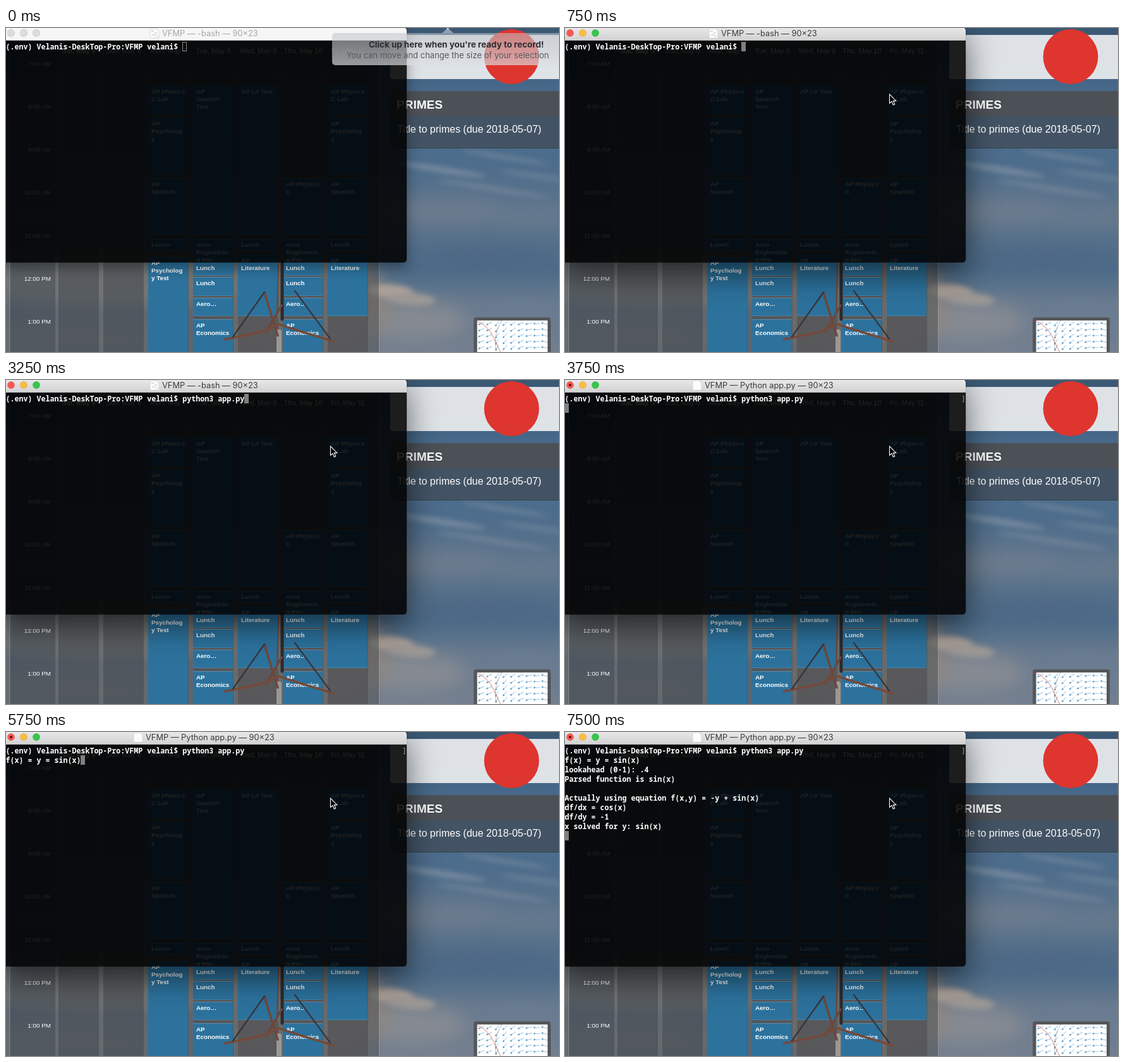
An HTML page that plays this animation: 875x514 px, repeating every 8 s.

```html
<!DOCTYPE html>
<html lang="en">
<head>
<meta charset="utf-8">
<title>Terminal session</title>
<style>
  html, body { margin: 0; width: 100%; height: 100%; overflow: hidden; background: #3a5d82; }
  #stage { position: relative; width: 875px; height: 514px; overflow: hidden; }
  svg { position: absolute; left: 0; top: 0; display: block; }
  text { white-space: pre; }
  #shade {
    position: absolute; left: -6px; top: -4px; width: 640px; height: 375.5px;
    border-radius: 5px; background: rgba(0, 0, 0, .87);
    box-shadow: 0 18px 50px rgba(0, 0, 0, .58), 0 0 1px #000;
  }
  #shade.idle { box-shadow: 0 8px 22px rgba(0, 0, 0, .38), 0 0 1px #000; }
  .cal { font-family: "Liberation Sans", Arial, sans-serif; fill: #fff; }
  .ui { font-family: Inter, "Open Sans", sans-serif; }
  .mono { font: 600 11.667px "Noto Sans Mono", "DejaVu Sans Mono", monospace; fill: #fff; }
</style>
</head>
<body>
<div id="stage">
  <svg id="back" width="875" height="514">
    <defs>
      <linearGradient id="sky" x1="0" y1="0" x2="0" y2="1">
        <stop offset="0" stop-color="#3a5874"/>
        <stop offset=".2" stop-color="#486a8b"/>
        <stop offset=".42" stop-color="#4d6d8c"/>
        <stop offset=".58" stop-color="#5f758c"/>
        <stop offset=".74" stop-color="#4b6a88"/>
        <stop offset=".84" stop-color="#66798e"/>
        <stop offset="1" stop-color="#747f8f"/>
      </linearGradient>
      <filter id="soft" x="-50%" y="-150%" width="200%" height="400%"><feGaussianBlur stdDeviation="14"/></filter>
      <filter id="wisp" x="-50%" y="-150%" width="200%" height="400%"><feGaussianBlur stdDeviation="5 4"/></filter>
    </defs>
    <rect width="875" height="514" fill="url(#sky)"/>
    <g id="clouds" filter="url(#soft)"></g>
    <g id="streaks" filter="url(#wisp)"></g>
    <g id="calendar" class="cal"></g>
    <g id="rocket" fill="none" stroke-linecap="round">
      <path d="M437 372V462" stroke="#2c2a2d" stroke-width="5"/>
      <path d="M431 374L429 450" stroke="#70473d" stroke-width="2"/>
      <path d="M432 482V514" stroke="#9b9794" stroke-width="8"/>
      <path d="M409 420L430 488M436 440L412 482" stroke="#6e4638" stroke-width="3.5"/>
      <path d="M346 494L404 482L432 470L462 480L518 497" stroke="#74493a" stroke-width="3.5"/>
      <path d="M409 419L359 490M457 417L513 493" stroke="#37343a" stroke-width="2.2"/>
    </g>
    <g id="notes" class="cal">
      <rect x="608" y="11" width="275" height="70" rx="4" fill="#f0f1f3" fill-opacity=".9"/>
      <rect x="608" y="100" width="275" height="91" rx="4" fill="#3c3e42" fill-opacity=".52"/>
      <path d="M608 141V104q0-4 4-4H875V141Z" fill="#4f5053" fill-opacity=".75"/>
      <path d="M609 190.5H875" stroke="#222" stroke-opacity=".4"/>
      <text x="618" y="128" font-size="19" font-weight="700">PRIMES</text>
      <text x="619" y="166" font-size="16">Title to primes (due 2018-05-07)</text>
      <circle cx="800" cy="45.5" r="43.5" fill="#de352e"/>
    </g>
    <g id="plot">
      <rect x="740" y="459" width="122" height="65" rx="4" fill="#55575a"/>
      <rect x="745.5" y="464" width="111.5" height="50" fill="#fff"/>
    </g>
  </svg>

  <div id="shade"></div>

  <svg id="front" width="875" height="514">
    <defs>
      <linearGradient id="bar" x1="0" y1="0" x2="0" y2="1">
        <stop offset="0" stop-color="#e9e8e9"/><stop offset="1" stop-color="#d2d1d2"/>
      </linearGradient>
      <linearGradient id="glass" x1="0" y1="0" x2="0" y2="1">
        <stop offset="0" stop-color="#bfc2c6" stop-opacity=".55"/>
        <stop offset="1" stop-color="#dcdfe2" stop-opacity=".68"/>
      </linearGradient>
    </defs>
    <path id="titlebar" d="M0 0H632q2 1 2 4V20H0Z"/>
    <path d="M0 19.5H634" stroke="#aaa" stroke-opacity=".6"/>
    <g id="lights"></g>
    <circle id="busy" cx="8" cy="8" r="2" fill="#5a0905"/>
    <g id="caption" class="ui" font-size="12.8">
      <path d="M-19 1h10l4 4v11h-14Z" fill="#fbfbfb" stroke="#cfcfcf" stroke-width=".7"/>
      <path id="ink" d="M-17 5h4M-12 8h4M-16 11h5M-10 13h3" stroke="#b9beb9"/>
      <text id="title" y="13"></text>
    </g>
    <g id="screen" class="mono"></g>
    <text id="wrap" class="mono" x="627" y="33" style="font-weight:400;fill:#999">]</text>
    <rect id="caret" width="7" height="15"/>
    <path id="pointer" d="M0 0V14.5L3.4 11.4L5.8 17L8.2 16L5.9 10.6H10.3Z" fill="#000" stroke="#fff" stroke-width="1.1"/>
    <g id="hint" class="ui" font-size="13" text-anchor="middle">
      <path d="M690 8L699 0L708 8Z" fill="#c9ced4" fill-opacity=".6"/>
      <path d="M697 2L699 0L701 2Z" fill="#fff"/>
      <rect x="516" y="8" width="370" height="51" rx="5" fill="url(#glass)"/>
      <text x="712.5" y="31" font-size="13.4" font-weight="700" fill="#2b2e32">Click up here when you're ready to record!</text>
      <text x="699" y="48" fill="#55595e">You can move and change the size of your selection</text>
    </g>
  </svg>
</div>
<script>
const $ = id => document.getElementById(id);
function add(parent, tag, attrs, text) {
  const el = document.createElementNS('http://www.w3.org/2000/svg', tag);
  for (const k in attrs) el.setAttribute(k, attrs[k]);
  if (text) el.textContent = text;
  return parent.appendChild(el);
}
const rect = (p, x, y, width, height, fill, more) => add(p, 'rect', { x, y, width, height, fill, ...more });

// Clouds: cx, cy, rx, ry, colour
[
  [690, 290, 100, 20, '#6c7c8e'], [830, 300, 70, 14, '#667a8e'],
  [760, 365, 110, 16, '#4d6884'], [640, 465, 90, 30, '#858a92'],
  [820, 470, 80, 30, '#6b7d92'], [460, 440, 150, 90, '#8b8581'],
  [150, 400, 240, 45, '#9a9793'], [60, 490, 200, 30, '#838789']
].forEach(([cx, cy, rx, ry, fill]) => add($('clouds'), 'ellipse', { cx, cy, rx, ry, fill }));
[
  [690, 225, 70, 4, '#7d8fa1'], [790, 205, 70, 3, '#6f869c'], [770, 255, 90, 4, '#6f8397'],
  [840, 235, 60, 3, '#6d849b'], [610, 418, 36, 11, '#aaa098'], [640, 430, 40, 10, '#9c9895']
].forEach(([cx, cy, rx, ry, fill]) => add($('streaks'), 'ellipse',
  { cx, cy, rx, ry, fill, transform: `rotate(${cy < 300 ? 9 : 4} ${cx} ${cy})` }));

// Calendar
const cal = $('calendar');
const colX = i => 83 + i * 71;
rect(cal, 0, 0, 590, 514, '#44494f', { 'fill-opacity': .45 });
rect(cal, 7, 0, 71, 514, '#38444f', { 'fill-opacity': .45 });
rect(cal, 5, 0, 1, 514, '#9a9a9a', { 'fill-opacity': .5 });
rect(cal, 590, 0, 1, 514, '#b5b0aa', { 'fill-opacity': .4 });
'Sat,Sun,Mon,Tue,Wed,Thu,Fri'.split(',').forEach((day, i) => {
  rect(cal, colX(i), 20, 64, 494, i < 2 ? '#3e464e' : '#48494d', { 'fill-opacity': .5 });
  add(cal, 'text', { x: colX(i) + 32, y: 40, 'font-size': 11, 'text-anchor': 'middle',
    'font-weight': i ? 400 : 700 }, `${day}, May ${i + 5}`);
});
const hours = [7, 8, 9, 10, 11, 12, 1].map((h, i) => add(cal, 'text', {
  x: 71, y: 60 + i * 68.15, 'font-size': 9.9, 'text-anchor': 'end'
}, `${h}:00 ${h > 6 && h < 12 ? 'AM' : 'PM'}`));

function event(col, top, bottom, label) {
  const x = colX(col);
  rect(cal, x, top, 63, bottom - top, '#2a74a2', { 'fill-opacity': .94 });
  rect(cal, x, top, 63, 1, '#6aa5c9', { 'fill-opacity': .6 });
  rect(cal, x, bottom - 1, 63, 1, '#6aa5c9', { 'fill-opacity': .35 });
  label.split('|').forEach((line, i) =>
    add(cal, 'text', { x: x + 5, y: top + 13 + i * 12.2, 'font-size': 9.8, 'font-weight': 700 }, line));
}
for (const c of [2, 6]) {
  event(c, 91, 137, 'AP Physics|C Lab');
  event(c, 141.5, 233, 'AP|Psycholog|y');
  event(c, 238, 329, 'AP|Spanish');
}
for (const c of [2, 4, 6]) event(c, 334, 354, 'Lunch');
event(2, 363, 520, 'AP|Psycholog|y Test');
event(3, 91, 329, 'AP|Spanish|Test');
event(4, 91, 329, 'AP Lit Test');
event(5, 238, 329, 'AP Physics|C');
for (const c of [4, 6]) event(c, 359, 457, 'AP|Literature');
for (const c of [3, 5]) {
  event(c, 334, 370, 'Aero|Engineerin|g Pre-');
  event(c, 370.5, 393, 'Lunch');
  event(c, 395, 425, 'Lunch');
  event(c, 428, 457, 'Aero…');
  event(c, 462, 520, 'AP|Economics');
}

// Slope field thumbnail
for (let x = 752; x < 856; x += 12.5)
  for (let y = 469; y < 514; y += 9.5) {
    const turn = x < 775 ? -22 : -58 + (x - 775) * .95 - (y - 464) * .15;
    add($('plot'), 'path', { d: 'M5 0H-4M-5 0l2.4-1.3v2.6Z', fill: '#4f94c8', stroke: '#5f9fce',
      'stroke-width': .6, transform: `translate(${x} ${y}) rotate(${turn})` });
  }
add($('plot'), 'path', { d: 'M746 465Q764 474 771 490T783 514', fill: 'none', stroke: '#d8806c' });
add($('plot'), 'path', { d: 'M784 464Q770 490 776 514', fill: 'none', stroke: '#777', 'stroke-dasharray': '2 2' });

const lights = ['#fc5753', '#fdbc40', '#34c84a'].map((on, i) =>
  ({ on, el: add($('lights'), 'circle', { cx: 8 + 20 * i, cy: 8, r: 5.7, 'stroke-width': .7 }) }));
const rows = Array.from({ length: 10 }, (_, i) => add($('screen'), 'text', { x: -.5, y: 34 + 15 * i }));

const LOOP = 8000;
const PROMPT = '(.env) Velanis-DeskTop-Pro:VFMP velani$ ';
const RESULT = ['Parsed function is sin(x)', '', 'Actually using equation f(x,y) = -y + sin(x)',
  'df/dx = cos(x)', 'df/dy = -1', 'x solved for y: sin(x)', ''];

// Keystrokes: [time, characters so far]
function type(text, t, keys) {
  const last = keys.filter(k => k[0] <= t).pop();
  return text.slice(0, last ? last[1] : 0);
}
function output(t) {
  const lines = [PROMPT + type('python3 app.py', t, [[1500, 1], [1750, 3], [2000, 5], [2250, 8],
    [2500, 10], [2750, 11], [3000, 13], [3250, 14]])];
  if (t >= 3500) lines.push(t < 4750 ? '' : 'f(x) = y = ' + type('sin(x)', t, [[5250, 3], [5500, 5], [5750, 6]]));
  if (t >= 6250) lines.push('lookahead (0-1): ' + type('.4', t, [[7250, 2]]));
  if (t >= 7500) lines.push(...RESULT);
  return lines;
}
function caption(t) {
  if (t < 3500) return ['VFMP — -bash — 90×23', 247];
  if (t < 3750) return ['VFMP — Python app.py ◂ -bash — 90×23', 200];
  return ['VFMP — Python app.py — 90×23', 221];
}
const set = (el, attrs) => { for (const k in attrs) el.setAttribute(k, attrs[k]); };
const show = (el, on) => el.setAttribute('visibility', on ? 'visible' : 'hidden');

function draw(t) {
  const active = t >= 750, running = t >= 3500;
  $('shade').className = active ? '' : 'idle';
  set($('titlebar'), { fill: active ? 'url(#bar)' : '#f6f6f6' });
  lights.forEach(l => set(l.el, { fill: active ? l.on : '#dcdcdc', stroke: active ? 'rgba(0,0,0,.15)' : '#c4c4c4' }));
  show($('busy'), running);
  show($('wrap'), running);

  const [name, x] = caption(t);
  $('title').textContent = name;
  set($('title'), { fill: active ? '#3b3b3b' : '#a5a5a5' });
  set($('caption'), { transform: `translate(${x} 0)` });
  show($('ink'), !running);

  const lines = output(t), end = lines.length - 1;
  rows.forEach((row, i) => { row.textContent = lines[i] || ''; });
  const cx = lines[end].length * 7 - 1, cy = 22 + end * 15;
  set($('caret'), active
    ? { x: cx, y: cy, width: 7, height: 15, fill: '#7f7f7f', stroke: 'none' }
    : { x: cx + .5, y: cy + .5, width: 6, height: 14, fill: 'none', stroke: '#8a8a8a' });
  show(hours[0], t < 6250);
  show(hours[1], t < 7500);

  show($('hint'), t < 250);
  show($('pointer'), t >= 250);
  set($('pointer'), { transform: t < 500 ? 'translate(551.5 77)' : 'translate(513.5 105)' });
}
const start = performance.now();
function tick(now) {
  draw(Math.max(0, now - start) % LOOP);
  requestAnimationFrame(tick);
}
draw(0);
requestAnimationFrame(tick);
</script>
</body>
</html>
```
